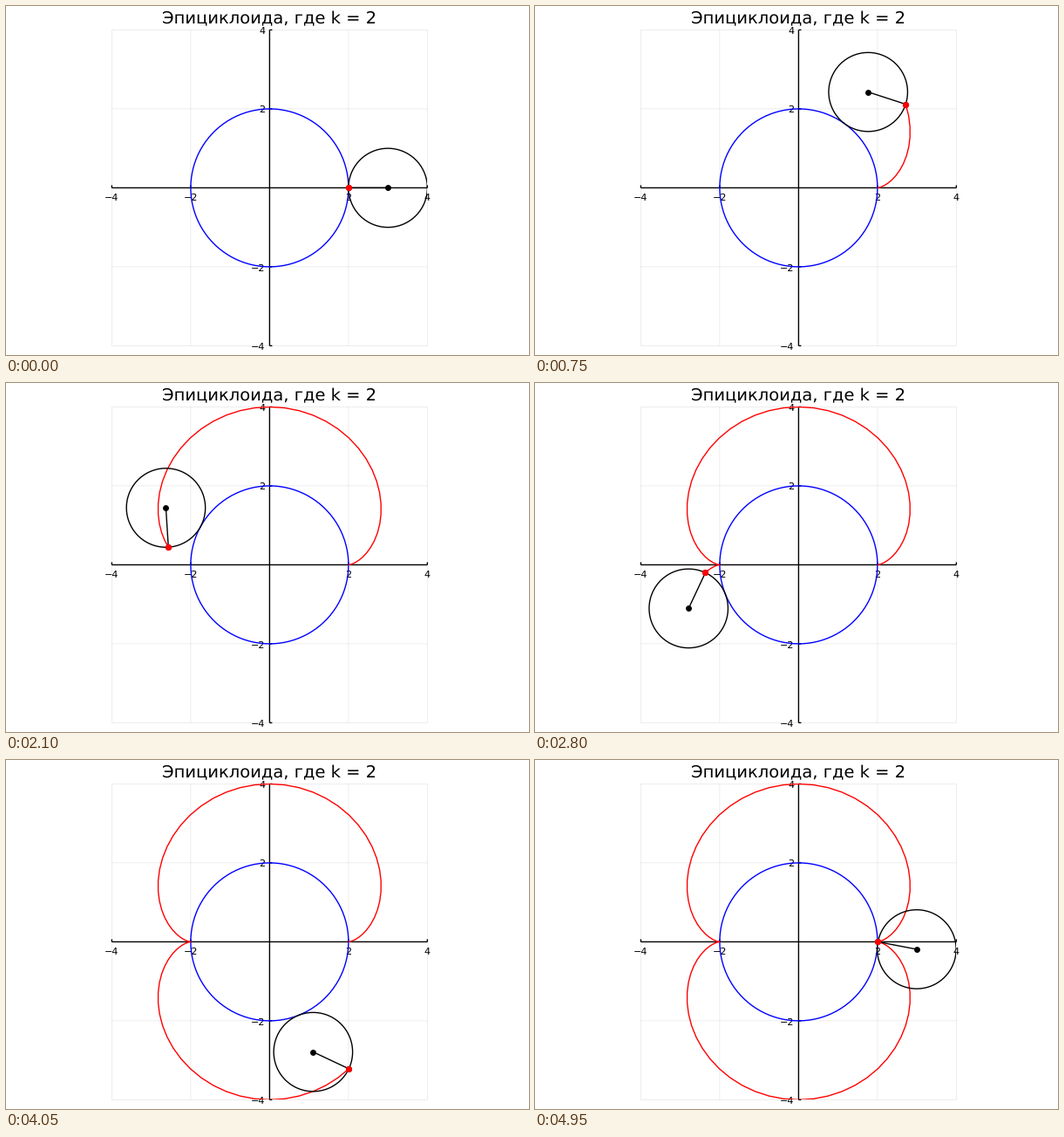
Animation, 600 px wide and 400 px high, one loop 5000 ms. Source, as a matplotlib script:

```python
import numpy as np
import matplotlib.pyplot as plt
from matplotlib.animation import FuncAnimation

W, H, DPI = 600, 400, 100
FRAMES, INTERVAL = 100, 50
CX, CY, UNIT = 302.4, 208.4, 45.25  # origin and unit length in pixels
LIM, K, R = 4, 2, 1                 # base circle has radius K * R
PX = 72 / DPI                       # one pixel in points

plt.rcParams.update({
    "font.family": "DejaVu Sans",
    "text.hinting": "none",
    "path.snap": False,
    "lines.linewidth": 1,
    "lines.solid_capstyle": "butt",
})

fig = plt.figure(figsize=(W / DPI, H / DPI), dpi=DPI, facecolor="white")
half = LIM * UNIT
ax = fig.add_axes([(CX - half) / W, (H - CY - half) / H,
                   2 * half / W, 2 * half / H])
ax.set_xlim(-LIM, LIM)
ax.set_ylim(-LIM, LIM)
ax.axis("off")


def label(text, xy, dx, dy, ha, size=8):
    """Text on its baseline, shifted from a data point by pixels."""
    ax.annotate(text, xy, xytext=(dx * PX, dy * PX),
                textcoords="offset points", ha=ha, va="baseline",
                fontsize=size, annotation_clip=False)


def rule(xs, ys, **style):
    ax.plot(xs, ys, color="black", clip_on=False, zorder=1, **style)


def draw_axes():
    ends, tick = [-LIM, LIM], 3 / UNIT
    for v in (-4, -2, 2, 4):
        rule([v, v], ends, lw=0.5, alpha=0.1)
        rule(ends, [v, v], lw=0.5, alpha=0.1)
    rule(ends, [0, 0])
    rule([0, 0], ends)
    for v in (-4, -2, 2, 4):
        rule([v, v], [0, tick])
        rule([0, tick], [v, v])
        text = str(v).replace("-", "\u2212")
        label(text, (v, 0), 0, -14.6, "center")
        label(text, (0, v), -5, -4.6, "right")
    label("Эпициклоида, где k = 2", (0, LIM), 0, 7.4, "center", 14)


draw_axes()

theta = np.linspace(0, 2 * np.pi, FRAMES + 1)
ring_x, ring_y = np.cos(theta), np.sin(theta)
center_x, center_y = R * (K + 1) * ring_x, R * (K + 1) * ring_y
pen_x = center_x - R * np.cos((K + 1) * theta)
pen_y = center_y - R * np.sin((K + 1) * theta)

ax.plot(K * R * ring_x, K * R * ring_y, color="blue", zorder=4)
trail, = ax.plot([], [], color="red", zorder=5)
wheel, = ax.plot([], [], color="black", zorder=6)
arm, = ax.plot([], [], color="black", marker="o", ms=5, mew=0, zorder=7)
pen, = ax.plot([], [], color="red", marker="o", ms=5.2, mew=0, zorder=8)


def update(i):
    cx, cy, px, py = center_x[i], center_y[i], pen_x[i], pen_y[i]
    trail.set_data(pen_x[:i + 1], pen_y[:i + 1])
    wheel.set_data(cx + R * ring_x, cy + R * ring_y)
    arm.set_data([cx, px], [cy, py])
    pen.set_data([px], [py])
    return trail, wheel, arm, pen


anim = FuncAnimation(fig, update, frames=FRAMES, interval=INTERVAL,
                     repeat=True, repeat_delay=0)
plt.show()
```
